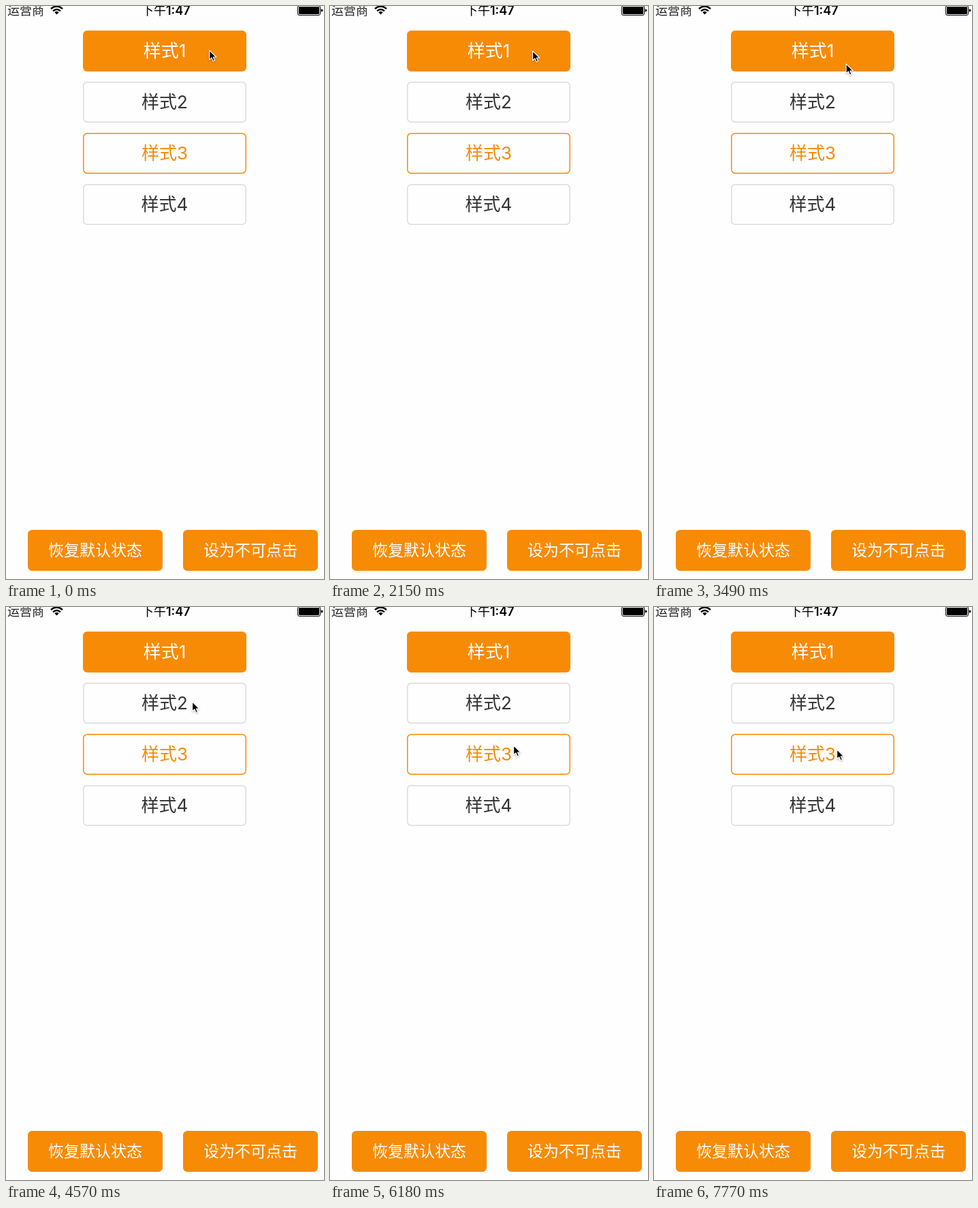
Animation of 467x840 px, one loop 8000 ms. Source, as an HTML page:

```html
<!DOCTYPE html>
<html lang="zh-CN">
<head>
<meta charset="utf-8">
<title>按钮样式</title>
<style>
  html, body { margin: 0; width: 100%; height: 100%; overflow: hidden; background: #fefefe; }
  svg { display: block; width: 467px; height: 840px; }
  text { font-family: Inter, "Noto Sans CJK SC", sans-serif; }
  .label { text-anchor: middle; }
</style>
</head>
<body>
<svg viewBox="0 0 467 840">
  <g id="status">
    <text x="2" y="13" font-size="18" fill="#222">运营商</text>
    <g fill="none" stroke="#000" stroke-width="2.4">
      <path d="M66 4.2Q74.5 -3.4 83 4.2M69 7.4Q74.5 2.6 80 7.4"/>
      <path d="M71.3 9.3Q74.5 6.7 77.7 9.3L74.5 12.6Z" fill="#000" stroke="none"/>
    </g>
    <text x="199" y="13" font-size="18" font-weight="500">下午<tspan font-weight="600">1:47</tspan></text>
    <rect x="428.5" y="-.5" width="33" height="14" rx="2.5" fill="none" stroke="#000"/>
    <rect x="430" y="1" width="30" height="11" rx="1.2"/>
    <path d="M462.7 4.2Q465.4 4.6 465.4 6.5T462.7 8.8Z"/>
  </g>
  <g id="buttons"></g>
  <path id="cursor" d="M.6 .9V15L3.9 11.9L6.2 17L8.6 16L6.4 11H10.9Z"
        stroke="#fff" stroke-width="1.2" stroke-linejoin="round"
        style="filter: drop-shadow(0 1px 1px rgba(0,0,0,.3))"/>
</svg>
<script>
const LOOP = 8000;
const ORANGE = '#f78b06';
const solid = { fill: ORANGE, stroke: ORANGE, text: '#fff' };
const plain = { fill: '#fefefe', stroke: '#dcdcdc', text: '#333' };
const outline = { fill: '#fefefe', stroke: ORANGE, text: ORANGE };

const styleButtons = [
  { style: solid, pressed: { fill: '#dc7a04', stroke: '#dc7a04', text: '#fff' },
    presses: [[540, 1070], [1610, 2150], [2420, 2690], [2960, 3490]] },
  { style: plain, pressed: { fill: '#ebebeb', stroke: '#d0d0d0', text: '#333' },
    presses: [[4030, 4570], [4830, 5100], [5370, 5640], [5910, 6180]] },
  { style: outline, pressed: { fill: '#feeedb', stroke: ORANGE, text: ORANGE },
    presses: [[6710, 7240], [7510, 7770]] },
  { style: plain, presses: [] },
];

// Pointer steps: time, x, y
const pointer = [
  [0, 298, 64], [1610, 297, 65], [3490, 281.5, 84], [3760, 281, 141],
  [4030, 273, 138], [4830, 272, 138], [6180, 269, 202], [6440, 268, 204], [6710, 268, 208],
];

const cursor = document.getElementById('cursor');
const group = document.getElementById('buttons');

function add(tag, attrs) {
  const node = document.createElementNS(group.namespaceURI, tag);
  for (const key in attrs) node.setAttribute(key, attrs[key]);
  return group.appendChild(node);
}

function makeButton(x, y, width, label, size) {
  const box = add('rect', { x: x + .75, y: y + .75, width: width - 1.5, height: 58.5, rx: 5.5, 'stroke-width': 1.5 });
  const text = add('text', { class: 'label', x: x + width / 2, y: y + 30 + size * .36, 'font-size': size });
  text.textContent = label;
  return look => {
    box.setAttribute('fill', look.fill);
    box.setAttribute('stroke', look.stroke);
    text.setAttribute('fill', look.text);
  };
}

styleButtons.forEach((button, i) => {
  button.paint = makeButton(113, 36 + 75 * i, 240, '样式' + (i + 1), 26);
});
makeButton(32, 768, 198, '恢复默认状态', 23)(solid);
makeButton(260, 768, 198, '设为不可点击', 23)(solid);

function render(now) {
  const t = now % LOOP;
  for (const { style, pressed, presses, paint } of styleButtons) {
    paint(presses.some(([down, up]) => t >= down && t < up) ? pressed : style);
  }
  const [, x, y] = pointer.filter(step => step[0] <= t).pop();
  cursor.setAttribute('transform', `translate(${x} ${y})`);
}

const start = performance.now();
function tick() {
  render(performance.now() - start);
  requestAnimationFrame(tick);
}
tick();
</script>
</body>
</html>
```
